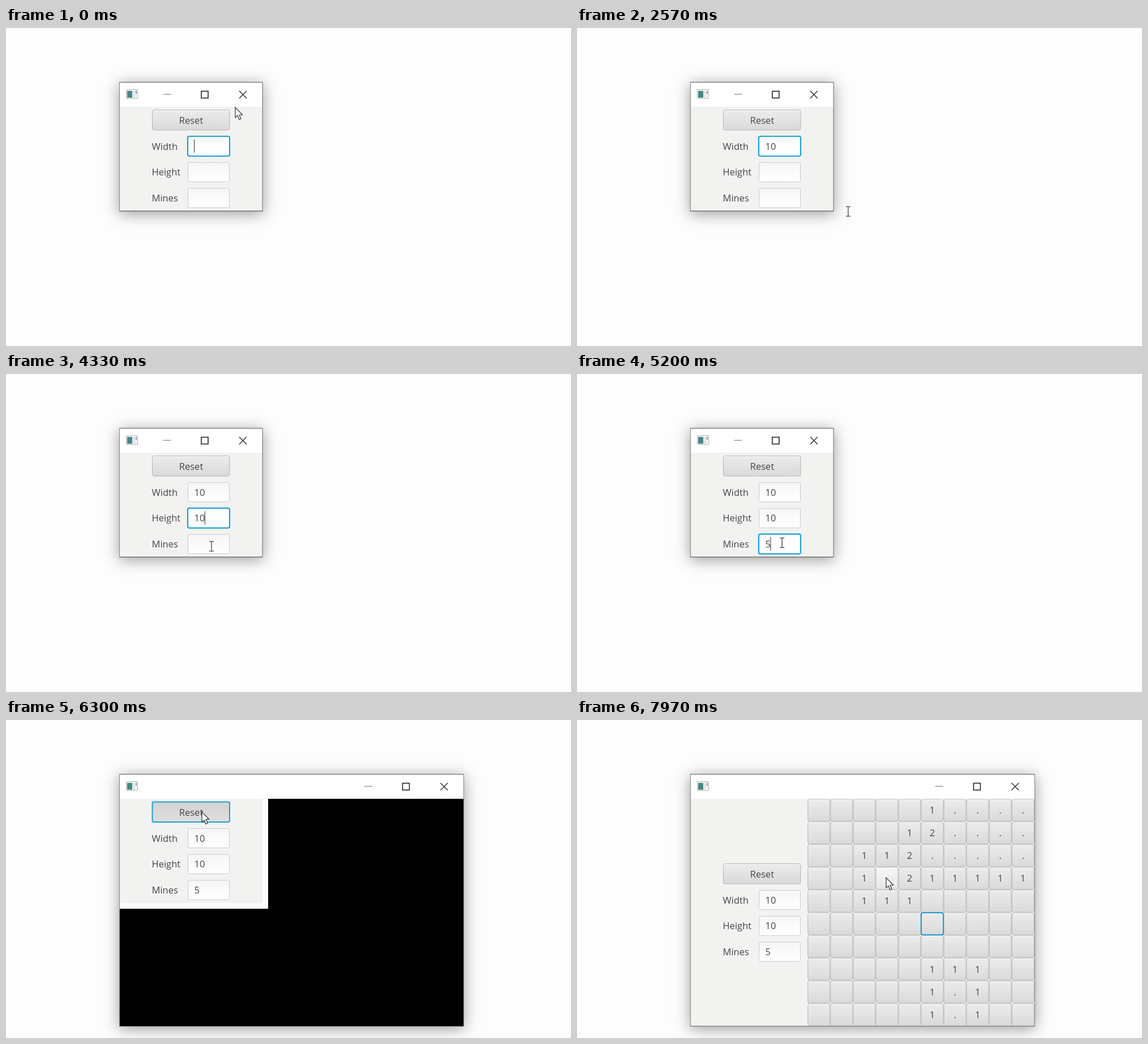
An HTML page with a canvas for the animation above (8000 ms loop, 998 by 561 pixels).

```html
<!DOCTYPE html>
<html lang="en">
<head>
<meta charset="utf-8">
<title>Mine grid</title>
<style>
html, body { margin: 0; width: 100%; height: 100%; overflow: hidden; background: #fdfdfd; }
canvas { display: block; }
</style>
</head>
<body>
<canvas id="stage" width="998" height="561"></canvas>
<script>
const ctx = document.getElementById('stage').getContext('2d');
const LOOP = 8000;
const FONT = '16.5px "Open Sans", "Noto Sans", sans-serif';
const LEFT = 200, TOP = 95, BODY = 139;
const CELL = 40.05, GRID_X = 407.3, GRID_Y = 139.5;
const INK = '#454545', FOCUS = '#1d9fd2';

// Moments of the interaction in ms
const GROW = 6230, BUILT = 6370, PRESS = 6080, DIG = 6770, REVEAL = 6900;

const board = [
  '     1....',
  '    12....',
  '  112.....',
  '  1.211111',
  '  111     ',
  '          ',
  '          ',
  '     111  ',
  '     1.1  ',
  '     1.1  '
];

// Text fields: label, focus span, keystrokes as [time, text]
const fields = [
  { label: 'Width', from: 0, to: 2900, keys: [[-270, ''], [1500, '1'], [1730, '10']] },
  { label: 'Height', from: 2900, to: 4500, keys: [[2900, ''], [3130, '1'], [3330, '10']] },
  { label: 'Mines', from: 4500, to: PRESS, keys: [[4500, ''], [5050, '5']] }
];

const smooth = p => p * p * (3 - 2 * p);
const linear = p => p;
const easeIn = p => p * p;
const easeOut = p => p * (2 - p);

// Pointer path: time, x, y, easing towards that point
const path = [
  [30, 405, 140, linear],
  [500, 945, 595, easeIn],
  [2250, 820, 578, linear],
  [2570, 480, 324, linear],
  [2800, 360, 257, easeOut],
  [3500, 360, 257, linear],
  [4080, 363, 304, smooth],
  [5120, 363, 304, linear],
  [5760, 346, 162, smooth],
  [6400, 346, 162, linear],
  [6740, 611, 365, smooth],
  [7040, 611, 365, linear],
  [7430, 582, 322, smooth],
  [7570, 582, 322, linear],
  [7950, 546, 278, smooth]
];

function pointerAt(t) {
  let a = path[0];
  for (const b of path) {
    if (t < b[0]) {
      if (b === a) break;
      const p = b[3]((t - a[0]) / (b[0] - a[0]));
      return { x: a[1] + (b[1] - a[1]) * p, y: a[2] + (b[2] - a[2]) * p };
    }
    a = b;
  }
  return { x: a[1], y: a[2] };
}

const inside = (m, x, y, w, h) => m.x >= x && m.x < x + w && m.y >= y && m.y < y + h;

function rect(x, y, w, h, fill) {
  ctx.fillStyle = fill;
  ctx.fillRect(x, y, w, h);
}

function box(x, y, w, h, r, fill, stroke, width = 1) {
  ctx.beginPath();
  ctx.roundRect(x, y, w, h, r);
  ctx.fillStyle = fill;
  ctx.fill();
  ctx.strokeStyle = stroke;
  ctx.lineWidth = width;
  ctx.stroke();
}

function line(color, width, ...pts) {
  ctx.beginPath();
  for (let i = 0; i < pts.length; i += 4) {
    ctx.moveTo(pts[i], pts[i + 1]);
    ctx.lineTo(pts[i + 2], pts[i + 3]);
  }
  ctx.strokeStyle = color;
  ctx.lineWidth = width;
  ctx.stroke();
}

function text(str, x, y, align = 'left') {
  ctx.font = FONT;
  ctx.textAlign = align;
  ctx.fillStyle = INK;
  ctx.fillText(str, x, y);
}

function fade(y, h, a, b) {
  const g = ctx.createLinearGradient(0, y, 0, y + h);
  g.addColorStop(0, a);
  g.addColorStop(1, b);
  return g;
}

function button(x, y, w, h, state) {
  const tones = {
    plain: ['#ececec', '#d9d9d9'],
    hover: ['#f7f7f7', '#e6e6e6'],
    down: ['#d3d3d3', '#dddddd']
  }[state.down ? 'down' : state.hover ? 'hover' : 'plain'];
  const edge = state.focus ? FOCUS : '#b4b4b2';
  box(x, y, w, h, 3, fade(y, h, ...tones), edge, state.focus ? 2 : 1);
  if (!state.focus) line('rgba(255,255,255,.75)', 1, x + 2, y + 1, x + w - 2, y + 1);
}

function frame(right, bottom) {
  const w = right - LEFT, h = bottom - TOP;
  ctx.save();
  ctx.shadowColor = 'rgba(0,0,0,.38)';
  ctx.shadowBlur = 25;
  ctx.shadowOffsetY = 4;
  rect(LEFT, TOP, w, h, '#808080');
  ctx.restore();
  rect(LEFT, TOP, w, h, '#84847e');
  rect(LEFT + 1, TOP + 1.5, w - 2, BODY - TOP - 1.5, '#ffffff');
  rect(LEFT + 1, BODY, w - 2, bottom - BODY - 1.5, '#f2f2f1');

  box(212.5, 108.5, 20, 16, 0, '#f1f3f4', '#b4b8b8');
  rect(214, 111, 9, 12, '#478783');
  rect(224, 111, 4, 12, '#dfe5e8');
  rect(229, 111, 2, 5, '#8f9ba2');

  const min = right - 169, max = right - 102.5, close = right - 35;
  line('#b4b7a2', 2, min - 7, 117, min + 7, 117);
  ctx.strokeStyle = '#222';
  ctx.lineWidth = 1.6;
  ctx.strokeRect(max - 6, 111.5, 12, 12);
  line('#333', 1.5, close - 6.5, 111, close + 6.5, 124, close + 6.5, 111, close - 6.5, 124);
}

function drawField(f, y, t) {
  const focus = t >= f.from && t < f.to;
  const fill = fade(y, 35, focus ? '#fbfdfe' : '#f6f6f6', '#ffffff');
  if (focus) box(321, y, 74, 35, 3, fill, FOCUS, 2.2);
  else box(321.5, y + .5, 73, 34, 2, fill, '#cbcbcd');
  const last = f.keys.filter(k => k[0] <= t).pop();
  const value = last ? last[1] : '';
  text(value, 332.5, y + 23.5);
  if (focus && Math.floor((t - last[0]) / 500) % 2 === 0) {
    const x = 332.5 + ctx.measureText(value).width;
    line('#555', 1.3, x, y + 5.5, x, y + 29);
  }
}

function form(t, dy, m) {
  button(258.5, 144.5 + dy, 136.5, 35.5, {
    hover: inside(m, 258, 144 + dy, 137, 36),
    down: t >= PRESS && t < BUILT,
    focus: t >= PRESS && t < DIG
  });
  text('Reset', 327, 169 + dy, 'center');
  fields.forEach((f, i) => {
    const y = 191 + dy + i * 45.7;
    text(f.label, 257.5, y + 23.5);
    drawField(f, y, t);
  });
}

function grid(t, m) {
  for (let r = 0; r < 10; r++) {
    for (let c = 0; c < 10; c++) cell(r, c, t, m);
  }
  if (t >= DIG) cell(5, 5, t, m);
}

function cell(r, c, t, m) {
  const x = GRID_X + c * CELL, y = GRID_Y + r * CELL;
  const target = t >= DIG && r === 5 && c === 5;
  button(x + .5, y + .3, CELL - 1, CELL - 1, {
    hover: inside(m, x, y, CELL, CELL),
    down: target && t < REVEAL,
    focus: target
  });
  text(t < REVEAL ? '.' : board[r][c], x + CELL / 2, y + 25.7, 'center');
}

function arrow(x, y) {
  const pts = [0, 0, 0, 18, 4, 14.5, 7, 21.5, 10, 20, 7, 13.5, 12.5, 13];
  ctx.beginPath();
  for (let i = 0; i < pts.length; i += 2) ctx.lineTo(x + pts[i], y + pts[i + 1]);
  ctx.closePath();
  ctx.fillStyle = '#fff';
  ctx.fill();
  ctx.strokeStyle = '#3c3c44';
  ctx.lineWidth = 1.3;
  ctx.stroke();
}

function beam(x, y) {
  const pts = [x, y - 8, x, y + 8, x - 4, y - 8.5, x + 4, y - 8.5, x - 4, y + 8.5, x + 4, y + 8.5];
  line('#fff', 3, ...pts);
  line('#5a5a5a', 1.5, ...pts);
}

function draw(t) {
  const big = t >= GROW, built = t >= BUILT;
  const right = big ? 809 : 453.5, bottom = big ? 541 : 323.5;
  const dy = built ? 109 : 0;
  const m = pointerAt(t);

  rect(0, 0, 998, 561, '#fdfdfd');
  frame(right, bottom);
  if (big && !built) {
    rect(201, BODY, 607, 401, '#000');
    rect(201, BODY, 262, 194, '#fdfdfd');
    rect(201, BODY, 252, 184, '#f2f2f1');
  }
  form(t, dy, m);
  if (built) grid(t, m);

  const overField = fields.some((f, i) => inside(m, 321, 191 + dy + i * 45.7, 74, 35));
  const overWindow = inside(m, LEFT, TOP, right - LEFT, bottom - TOP);
  if (overField || !overWindow) beam(m.x, m.y);
  else arrow(m.x, m.y);
}

const start = performance.now();
function tick() {
  draw((performance.now() - start) % LOOP);
  requestAnimationFrame(tick);
}
tick();
</script>
</body>
</html>
```
